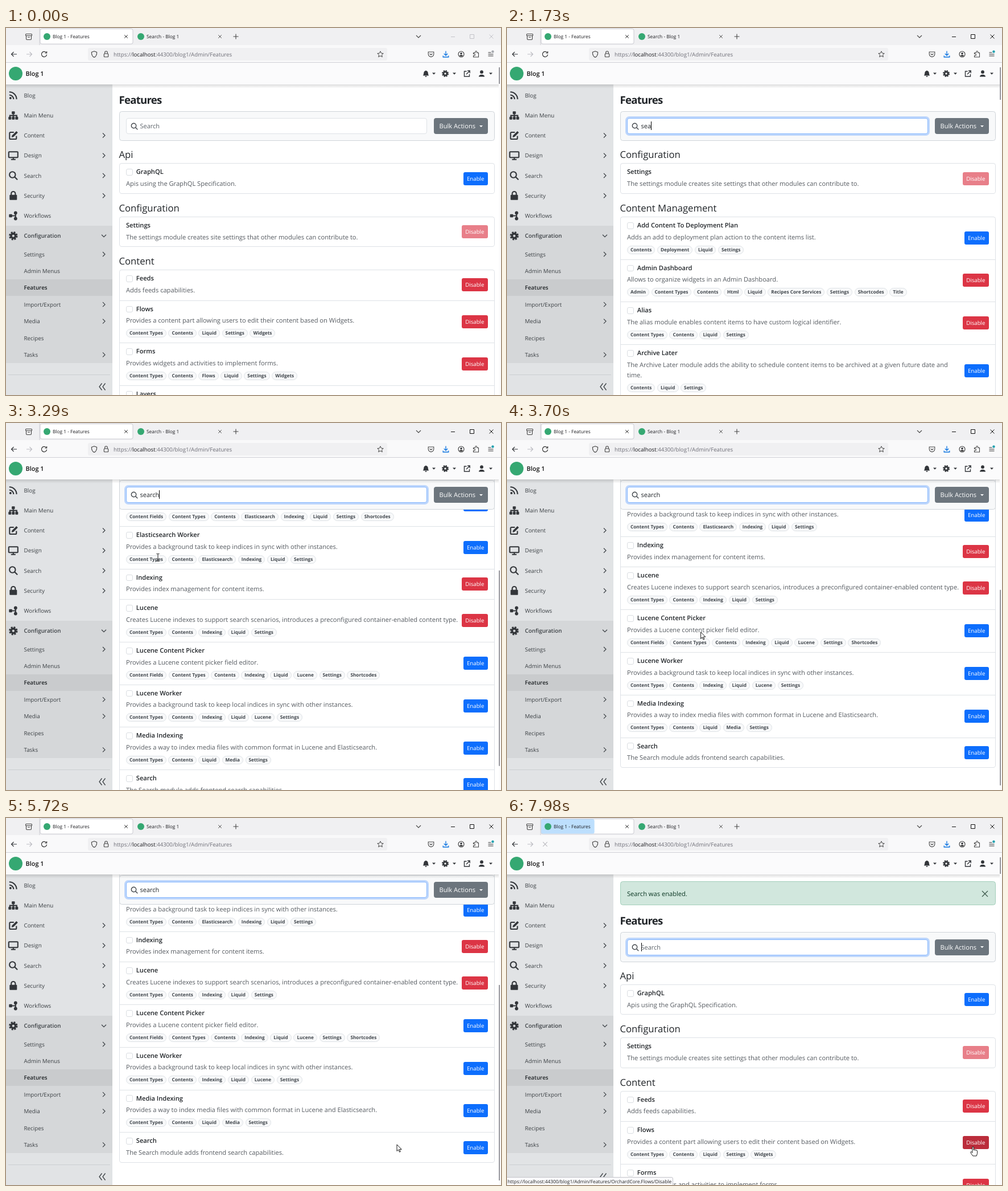
Recreate the animation shown at these times as an HTML page. Size 870x644 px, loop 8000 ms.

```html
<!DOCTYPE html>
<html lang="en">
<head>
<meta charset="utf-8">
<title>Features</title>
<style>
  html, body { margin: 0; width: 100%; height: 100%; overflow: hidden; background: #fff; }
  body { font: 11.13px/17.7px "Open Sans", "Noto Sans", sans-serif; color: #212529; text-rendering: geometricPrecision; }
  #stage { position: relative; width: 870px; height: 644px; overflow: hidden; }
  #stage > svg { position: absolute; left: 0; top: 0; }
  #page { position: absolute; inset: 0; clip-path: inset(99px 4px 0 187px); background: #fff; }
  #page > * { position: absolute; left: 198.5px; width: 660.5px; box-sizing: border-box; }
  h1 { margin: 0; font-size: 18.6px; font-weight: 700; letter-spacing: -.74px; line-height: 26px; }
  h3 { margin: 0; height: 40px; font-size: 16.7px; font-weight: 400; line-height: 50px; }
  em { font-style: normal; }
  .card { border-radius: 4.5px; box-shadow: inset 0 0 0 1px #dee2e6; }
  .item { position: relative; padding: 7px 12.5px 8px; }
  .item + .item { box-shadow: inset 0 1px #dee2e6; }
  .name { display: flex; align-items: center; font-weight: 600; }
  .name i { width: 9.8px; height: 9.8px; margin-right: 6px; border: 1px solid #dadee2; border-radius: 3px; }
  .desc { margin-top: 3px; color: #555a60; white-space: pre; }
  .tags { display: flex; gap: 3.6px; margin: 5.3px 0 1.1px; }
  .tags b { height: 13px; padding: 0 5px; border: 1px solid #dee2e6; border-radius: 8px; background: #f8f9fa; color: #40464c; font-size: 8.25px; line-height: 13px; white-space: nowrap; }
  .btn { position: absolute; right: 12.5px; top: 50%; height: 23px; margin-top: -11.5px; padding: 0 6px; border-radius: 3px; color: #fff; font-size: 9.7px; line-height: 23px; }
  .Enable { background: #0d6efd; }
  .Disable { background: #dc3545; }
  .locked { background: #e87f89; }
  #bar { height: 52.4px; border: 1px solid #cfd4d9; border-radius: 4.5px; background: #f8f9fa; }
  #box { position: absolute; left: 11.5px; top: 11.2px; width: 527px; height: 26px; border: 1px solid #dee2e6; border-radius: 4px; background: #fff; line-height: 27px; }
  #box svg { position: absolute; left: 7px; top: 7px; }
  #box span { position: absolute; left: 23.5px; font-size: 11px; white-space: pre; }
  #caret { display: inline-block; width: 1px; height: 15px; margin-right: -1px; vertical-align: -3px; background: #000; }
  #hint { color: #5c636a; }
  #bulk { position: absolute; right: 11.5px; top: 11.2px; width: 94.5px; height: 28px; box-sizing: border-box; padding-left: 9.5px; border-radius: 4px; background: #6c757d; color: #fff; line-height: 29px; }
  #bulk::after { content: ""; position: absolute; right: 9px; top: 12.5px; border: 3.3px solid transparent; border-top-color: #fff; border-bottom: 0; }
  #alert { top: 110.5px; height: 42.3px; border: 1px solid #a3cfbb; border-radius: 4.5px; background: #d1e7dd; color: #0a3622; padding-left: 11.5px; line-height: 43px; }
  #alert svg { position: absolute; right: 12px; top: 15px; }
  #status { position: absolute; left: -1px; top: 630px; height: 14px; padding: 0 2px 0 1px; border: 1px solid #c4c4ca; border-radius: 0 3px 0 0; background: #f9f9fb; color: #222; font-size: 8.35px; line-height: 15px; white-space: pre; }
</style>
</head>
<body>
<div id="stage">
  <div id="page">
    <div id="alert">Search was enabled.
      <svg width="12" height="12" fill="none" stroke="#3f5a4d" stroke-width="1.3"><path d="M1 1l10 10M11 1L1 11"/></svg>
    </div>
    <h1 id="title">Features</h1>
    <div id="all"></div><div id="se"></div><div id="search"></div>
    <div id="bar">
      <div id="box">
        <svg width="14" height="14" fill="none" stroke="#42474c" stroke-width="1.4"><circle cx="5.5" cy="5.5" r="4.2"/><path d="M8.5 8.5l3.8 3.8"/></svg>
        <span><em id="typed"></em><i id="caret"></i><em id="hint">Search</em></span>
      </div>
      <div id="bulk">Bulk Actions</div>
    </div>
  </div>
  <svg id="chrome" width="870" height="644"></svg>
  <div id="status"></div>
  <svg id="pointer" width="870" height="644">
    <g id="arrow" fill="#fff" stroke="#000" stroke-width=".9"><path d="M0 0V11.5L2.7 9 4.5 13.2 6.3 12.4 4.5 8.4H8.2Z"/></g>
    <g id="beam" fill="none" stroke="#222"><path d="M-2.5-6.5H-.8L0-6 .8-6.5H2.5M0-6V6M-2.5 6.5H-.8L0 6 .8 6.5H2.5"/></g>
    <g id="hand" fill="#fff" stroke="#000" stroke-width=".9" stroke-linejoin="round"><path d="M-1.2 9V1a1.2 1.2 0 0 1 2.4 0V6a1.1 1.1 0 0 1 2.2.2 1.1 1.1 0 0 1 2.2.4 1.1 1.1 0 0 1 2 .6V11.5L6.2 16H-.2L-4 10.6C-5 9-3.4 8-2.4 9L-1.2 10.4Z"/></g>
  </svg>
</div>
<script>
const $ = id => document.getElementById(id);

// Feature lists: [group, [name, description, tags, action], ...]
const CT = 'Content Types,Contents,';
const settings = ['Configuration', ['Settings', 'The settings module creates site settings that other modules can contribute to.', '', 'locked']];
const indexer = n => `Creates ${n} indexes to support search scenarios, introduces a preconfigured container-enabled content`;
const picker = n => `Provides a${n} content picker field editor.`;
const lists = {
  all: [
    ['Api', ['GraphQL', 'Apis using the GraphQL Specification.']],
    settings,
    ['Content',
      ['Feeds', 'Adds feeds capabilities.', '', 'Disable'],
      ['Flows', 'Provides a content part allowing users to edit their content based on Widgets.', CT + 'Liquid,Settings,Widgets', 'Disable'],
      ['Forms', 'Provides widgets and activities to implement forms.', CT + 'Flows,Liquid,Settings,Widgets', 'Disable'],
      ['Layers', 'Enables users to render Widgets across pages of the site based on conditions.', CT + 'Liquid,Settings,Widgets', 'Disable']]
  ],
  se: [
    settings,
    ['Content Management',
      ['Add Content To Deployment Plan', 'Adds an add to deployment plan action to the content items list.', 'Contents,Deployment,Liquid,Settings'],
      ['Admin Dashboard', 'Allows to organize widgets in an Admin Dashboard.', 'Admin,' + CT + 'Html,Liquid,Recipes Core Services,Settings,Shortcodes,Title', 'Disable'],
      ['Alias', 'The alias module enables content items to have custom logical identifier.', CT + 'Liquid,Settings', 'Disable'],
      ['Archive Later', 'The Archive Later module adds the ability to schedule content items to be archived at a given future date and\ntime.', 'Contents,Liquid,Settings']]
  ],
  search: [
    ['Search',
      ['Cloud Search', indexer('Cloud Search') + '\ntype.', CT + 'Indexing,Liquid,Settings'],
      ['Elasticsearch', indexer('Elasticsearch') + '\ntype.', CT + 'Indexing,Liquid,Settings'],
      ['Elasticsearch Content Picker', picker('n Elasticsearch'), 'Content Fields,' + CT + 'Elasticsearch,Indexing,Liquid,Settings,Shortcodes'],
      ['Elasticsearch Worker', 'Provides a background task to keep indices in sync with other instances.', CT + 'Elasticsearch,Indexing,Liquid,Settings'],
      ['Indexing', 'Provides index management for content items.', '', 'Disable'],
      ['Lucene', indexer('Lucene') + ' type.', CT + 'Indexing,Liquid,Settings', 'Disable'],
      ['Lucene Content Picker', picker(' Lucene'), 'Content Fields,' + CT + 'Indexing,Liquid,Lucene,Settings,Shortcodes'],
      ['Lucene Worker', 'Provides a background task to keep local indices in sync with other instances.', CT + 'Indexing,Liquid,Lucene,Settings'],
      ['Media Indexing', 'Provides a way to index media files with common format in Lucene and Elasticsearch.', CT + 'Liquid,Media,Settings'],
      ['Search', 'The Search module adds frontend search capabilities.']]
  ]
};

function itemHtml([name, desc, tags = '', action = 'Enable']) {
  const locked = action === 'locked';
  const pills = tags && `<div class="tags">${tags.split(',').map(s => `<b>${s}</b>`).join('')}</div>`;
  return `<div class="item"><div class="name">${locked ? '' : '<i></i>'}${name}</div><div class="desc">${desc}</div>${pills}` +
    `<div class="btn ${action}">${locked ? 'Disable' : action}</div></div>`;
}
for (const id in lists)
  $(id).innerHTML = lists[id].map(([group, ...items]) =>
    `<h3>${group}</h3><div class="card">${items.map(itemHtml).join('')}</div>`).join('');

// Browser frame, navigation bar and side menu
const rect = (x, y, w, h, fill, more = '') => `<rect x="${x}" y="${y}" width="${w}" height="${h}" fill="${fill}" ${more}/>`;
const text = (x, y, s, size, fill = '#1c1c20', weight = 400) =>
  `<text x="${x}" y="${y + size * .36}" font-size="${size}" fill="${fill}" font-weight="${weight}">${s}</text>`;
const icon = (x, y, body, color = '#33363a', width = 1.2, more = '') =>
  `<g transform="translate(${x} ${y})" fill="none" stroke="${color}" stroke-width="${width}" ${more}>${body}</g>`;
const line = d => `<path d="${d}"/>`;
const disc = (x, y, r, fill = '#33363a') => `<circle cx="${x}" cy="${y}" r="${r}" fill="${fill}" stroke="none"/>`;
const ring = (x, y, r, more = '') => `<circle cx="${x}" cy="${y}" r="${r}" ${more}/>`;
const slab = (x, y, w, h) => rect(x, y, w, h, '#33363a', 'rx="1" stroke="none"');
const cross = r => line(`M${-r} ${-r}L${r} ${r}M${r} ${-r}L${-r} ${r}`);
const right = line('M-2-4L2 0-2 4'), down = line('M-4-2L0 2 4-2');
const caret = x => `<path d="M${x - 3} 78.5h6l-3 3.2z" fill="#33363a"/>`;
const green = '#35a872';
const gear = ring(0, 0, 3.9, 'stroke-width="3.6"') + ring(0, 0, 6.3, 'stroke-width="2.8" stroke-dasharray="2.9 2.05"');

const menu = [
  ['Blog', disc(-5, 5, 2) + line('M-7-.5a7.5 7.5 0 0 1 7.5 7.5M-7-5.8A12.8 12.8 0 0 1 5.8 7')],
  ['Main Menu', slab(-2.7, -7, 5.4, 5) + slab(-8.5, 2.5, 5, 5) + slab(-2.5, 2.5, 5, 5) + slab(3.5, 2.5, 5, 5) + line('M0-2V3M-6 3V.4H6V3')],
  ['Content', line('M1-5.5H-5a1.5 1.5 0 0 0-1.5 1.5V5A1.5 1.5 0 0 0-5 6.5H4A1.5 1.5 0 0 0 5.5 5V1') + `<path d="M-3 3.5l.8-3.4L5.5-7.5 8-5 .5 2.6z" fill="#33363a" stroke="none"/>`, 1],
  ['Design', rect(-8, -6.5, 16, 10, 'none', 'rx="1"') + line('M0 4V7M-4 7H4'), 1],
  ['Search', ring(-1.5, -1.5, 5.2) + line('M2.5 2.5L7.3 7.3'), 1],
  ['Security', slab(-6.5, -1.5, 13, 9) + line('M-3.6-1V-3.6a3.6 3.6 0 0 1 7.2 0V-1'), 1],
  ['Workflows', slab(-7.5, -2.8, 5.6, 5.6) + disc(4, -5, 2.9) + disc(4, 5, 2.9) + line('M-2 0H4M4-4V4')],
  ['Configuration', gear, 2]
];
const submenu = ['Settings>', 'Admin Menus', 'Features', 'Import/Export>', 'Media>', 'Recipes', 'Tasks>'];

$('chrome').innerHTML = `
  <defs><linearGradient id="shade" x2="0" y2="1"><stop stop-opacity=".13"/><stop offset="1" stop-opacity="0"/></linearGradient></defs>
  ${rect(0, 0, 870, 30, '#f0f0f2')}${rect(0, 30, 870, 31, '#f9f9fa')}${rect(0, 60, 870, 1, '#d0d0d6')}
  ${rect(58.5, 0, 1, 30, '#cfcfd6')}
  ${rect(60, 1.5, 163, 26.5, '#fff', 'rx="3" stroke="#cbcbd2" stroke-width="1"')}
  ${rect(60, 2, 0, 25.5, '#bddffd', 'id="burst" rx="3"')}
  ${disc(72, 15, 6, green)}${disc(237, 15, 6, green)}
  ${text(82, 15, 'Blog 1 - Features', 8.36)}${text(247, 15, 'Search - Blog 1', 8.36)}
  ${icon(40, 15, rect(-5.5, -4.5, 11, 3, 'none', 'rx="1"') + line('M-4.5-1.5V4a1.5 1.5 0 0 0 1.5 1.5H3A1.5 1.5 0 0 0 4.5 4V-1.5M-1.8 1.2H1.8'), '#444', 1.1)}
  ${icon(211, 15, cross(2.8), '#333', 1)}${icon(376, 15, cross(2.8), '#555', 1)}
  ${icon(404, 15, line('M-4.5 0H4.5M0-4.5V4.5'), '#444', 1.1)}${icon(725, 15, down, '#444', 1.1)}
  <g id="win" fill="none">${line('M782 15.5h7M815.5 11.5h7v7h-7zM849.5 11.5l7 7M856.5 11.5l-7 7')}</g>
  ${icon(14, 46, line('M5 0H-4.5M-.5-4L-4.5 0-.5 4'))}${icon(41, 46, line('M-5 0H4.5M.5-4L4.5 0 .5 4'), '#bdbdc3')}
  ${icon(67, 46, line('M3.5-3A4.6 4.6 0 1 0 4.6 .6M4.6-5V-2H1.4'), '#333', 1.2, 'id="reload"')}
  ${icon(67, 46, cross(3.8), 'currentColor', 1.1, 'id="stop"')}
  ${rect(144, 35, 526, 22, '#f0f0f2', 'rx="3"')}
  ${icon(155, 46, line('M0-5.2L4.6-3.6C4.8 1 3 4 0 5.4-3 4-4.8 1-4.6-3.6Z'), '#444', 1.1)}
  ${icon(176, 46, rect(-3.7, -1, 7.4, 5.8, 'none', 'rx="1"') + line('M-2.3-1V-3a2.3 2.3 0 0 1 4.6 0V-1'), '#444', 1.1)}
  <text x="189" y="49.5" font-size="9.7" fill="#6f6f78">https://<tspan fill="#1c1c20">localhost</tspan>:44300/blog1/Admin/Features</text>
  ${icon(658, 46, line('M0-5.2L1.6-1.8 5.2-1.4 2.5 1 3.3 4.8 0 2.9-3.3 4.8-2.5 1-5.2-1.4-1.6-1.8Z'), '#444', 1)}
  ${icon(747, 46, line('M-4.8-4H4.8V-.2a4.8 4.8 0 0 1-9.6 0ZM-2.4-1L0 1.3 2.4-1'), '#444', 1.1)}
  ${icon(773, 46, line('M0-5.5V2M-3.2-1L0 2.2 3.2-1M-4.8 2.5V5H4.8V2.5'), '#0a72e0', 1.3)}
  ${icon(800, 46, ring(0, 0, 5) + disc(0, -1.3, 1.8) + `<path d="M-3.3 2.6a3.6 2.4 0 0 1 6.6 0 4.4 4.4 0 0 1-6.6 0z" fill="#333" stroke="none"/>`, '#333', 1.1)}
  ${icon(826, 46, line('M-4.5-2.5H-1.3V-4a1.5 1.5 0 0 1 3 0v1.5H4.5V5H-4.5V2.5H-3a1.5 1.5 0 0 0 0-3H-4.5Z'), '#444', 1.1)}
  ${icon(852, 46, line('M-4.5-3H.5M-4.5 0H4.5M-4.5 3H4.5'), '#333', 1.1)}<circle id="dot" cx="855.5" cy="41.5" r="2.2"/>

  ${rect(0, 99, 187, 545, '#e1e3e5')}${rect(0, 347, 187, 241, '#d5d7d9')}${rect(0, 441, 187, 29, '#c9cbcd')}
  ${rect(4, 608, 179, 1, '#cbced1')}
  ${menu.map(([label, art, arrow], i) => {
    const y = 118 + i * 35.25;
    return icon(12.8, y, art, '#33363a', 2.1) + text(31.5, y, label, 9.8, '#3c4145', arrow === 2 ? 600 : 400) +
      (arrow ? icon(172, y, arrow === 2 ? down : right, '#3c4145') : '');
  }).join('')}
  ${submenu.map((label, i) => {
    const y = 397 + i * 29.4;
    return text(31.5, y, label.replace('>', ''), 9.8, i === 2 ? '#1f2326' : '#3c4145', i === 2 ? 600 : 400) +
      (label.endsWith('>') ? icon(172, y, right, '#3c4145') : '');
  }).join('')}
  ${icon(169, 629.5, line('M-.5-6L-5 0-.5 6M5.5-6L1 0 5.5 6'), '#3c4145', 1.3)}

  ${rect(0, 61, 870, 38, '#fbfbfc')}${rect(0, 99, 866, 7, 'url(#shade)')}
  ${disc(17, 80, 12, green)}${text(34.5, 80, 'Blog 1', 10.9, '#111', 600)}
  ${icon(738, 80, `<path d="M-5.3 3.5C-3.8 2-4-.5-3.6-2A3.7 3.7 0 0 1-.7-5a.8.8 0 0 1 1.4 0A3.7 3.7 0 0 1 3.6-2C4-.5 3.8 2 5.3 3.5ZM-1.6 4.3H1.6a1.6 1.6 0 0 1-3.2 0z" fill="#33363a" stroke="none"/>`)}
  ${caret(752)}${icon(772, 80, `<g transform="scale(.78)">${gear}</g>`)}${caret(788)}
  ${icon(810, 80, line('M-.5-4H-4.5V5H4.5V1M1-5H5.2V-.8M5-4.8L-1 1.2'), '#33363a', 1.4)}
  ${icon(836, 80, disc(0, -2.8, 2.9) + `<path d="M-5 5.5C-5 .5 5 .5 5 5.5Z" fill="#33363a" stroke="none"/>`)}${caret(852)}
  ${rect(866, 61, 4, 583, '#fbfbfc')}${rect(866.3, 69, 1.7, 29, '#85858c', 'id="thumb"')}`;

// Timeline
const LOOP = 8000, LOADED = 7640, MAX_SCROLL = 373.3;
const clamp = v => Math.min(1, Math.max(0, v));
const keystrokes = [1330, 1530, 1700, 1870, 2060, 2200];
const path = [
  [130, 640, 574, 'arrow'], [450, 470, 400, 'arrow'], [780, 290, 185, 'beam'], [870, 267, 172, 'beam'], [1330, 267, 172, ''],
  [2930, 267, 236, 'beam'], [3450, 267, 236, 'arrow'], [3780, 353, 389, 'arrow'], [3880, 353, 389, 'arrow'],
  [4510, 242, 585, 'beam'], [4750, 294, 584, 'beam'], [4960, 236, 585, 'beam'], [5190, 264, 585, 'beam'],
  [5450, 264, 585, 'arrow'], [5690, 687, 573, 'arrow'], [5760, 687, 573, 'arrow'], [6050, 841, 561, 'arrow'],
  [6270, 822, 578, 'hand'], [7800, 822, 578, 'hand'], [7920, 819, 577, 'hand'], [LOOP, 819, 577, 'hand']
];
const enable = [...$('search').querySelectorAll('.btn')].pop();
const flows = $('all').querySelectorAll('.btn')[3];
const show = (id, on) => $(id).style.display = on ? '' : 'none';
const shade = (el, k) => el.style.boxShadow = `inset 0 0 0 30px rgba(0,0,0,${.15 * k})`;

function drawPointer(t) {
  const i = path.findLastIndex(k => k[0] <= t);
  const kind = i < 0 ? '' : path[i][3];
  ['arrow', 'beam', 'hand'].forEach(id => show(id, id === kind));
  if (!kind) return;
  const [t0, x0, y0] = path[i], [t1, x1, y1] = path[i + 1] || path[i];
  const u = t1 > t0 ? (t - t0) / (t1 - t0) : 0, e = u * u * (3 - 2 * u);
  $(kind).setAttribute('transform', `translate(${x0 + (x1 - x0) * e} ${y0 + (y1 - y0) * e})`);
}

function caretOn(t) {
  if (t < 1000 || t > 6480 && t < LOADED + 60) return false;
  return t < 2400 || t > LOADED || Math.floor((t - 2400) / 510) % 2 === 1;
}

function render(t) {
  const loaded = t >= LOADED, active = t >= 870;
  const list = loaded || t < 1600 ? 'all' : t < 1800 ? 'se' : 'search';
  const scroll = loaded ? 0 : MAX_SCROLL * (1 - (1 - clamp((t - 2865) / 915)) ** 3);
  const top = (loaded ? 54.4 : 0) - scroll;

  show('alert', loaded);
  $('title').style.top = 114 + top + 'px';
  $('bar').style.top = Math.max(146 + top, 100) + 'px';
  for (const id in lists) { show(id, id === list); $(id).style.top = 197.4 + top + 'px'; }
  $('thumb').setAttribute('y', 69 + scroll * .6);
  $('thumb').setAttribute('height', { all: 29, se: 57, search: 343 }[list]);

  const typed = loaded ? '' : 'search'.slice(0, keystrokes.filter(k => k <= t).length);
  $('typed').textContent = typed;
  show('hint', !typed);
  $('caret').style.visibility = caretOn(t) ? '' : 'hidden';
  const glow = loaded ? clamp((t - LOADED - 60) / 100) : clamp((t - 910) / 90);
  $('box').style.borderColor = glow > .5 ? '#86b7fe' : '#dee2e6';
  $('box').style.boxShadow = `0 0 0 3px rgba(13,110,253,${.25 * glow})`;

  shade(enable, clamp((t - 6330) / 150) + (t > 7290 ? .35 : 0));
  shade(flows, clamp((t - 7830) / 150));
  const target = t >= 6420 && !loaded ? 'Search/Enable' : t >= 7850 ? 'Flows/Disable' : '';
  show('status', target);
  $('status').textContent = 'https://localhost:44300/blog1/Admin/Features/OrchardCore.' + target;

  $('win').setAttribute('stroke', active ? '#111' : '#c3c3c8');
  $('dot').setAttribute('fill', active ? '#1f9fae' : '#a5a8ae');
  const loading = t >= 7360;
  show('reload', !loading);
  show('stop', loading);
  $('stop').style.color = t < 7800 ? '#333' : '#b9b9bf';
  $('burst').setAttribute('width', 163 * clamp((t - 7850) / 228));
  drawPointer(t);
}

function tick() {
  render(performance.now() % LOOP);
  requestAnimationFrame(tick);
}
tick();
</script>
</body>
</html>
```
